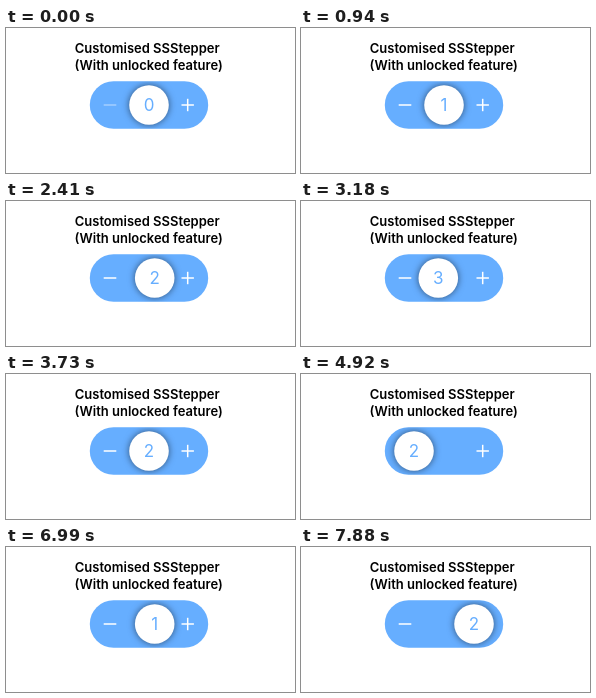
Animation of 289 by 145 pixels, one loop 7.99 s. Source, as an HTML page with a canvas:

```html
<!DOCTYPE html>
<html lang="en">
<head>
<meta charset="utf-8">
<title>Stepper</title>
<style>
  html, body { margin: 0; width: 100%; height: 100%; overflow: hidden; background: #fff; }
  canvas { display: block; width: 289px; height: 145px; }
</style>
</head>
<body>
<canvas id="stage"></canvas>
<script>
const W = 289, H = 145, LOOP = 7990;
const BLUE = '#66aeff';
const FONT = 'Inter, Roboto, sans-serif';
const CX = 143, CY = 77, RADIUS = 19.8;
const REACH = 30, STEP = 110;
const canvas = document.getElementById('stage');
const ctx = canvas.getContext('2d');
const dpr = window.devicePixelRatio || 1;
canvas.width = W * dpr;
canvas.height = H * dpr;

// Thumb drags; the last one is still held when the loop restarts.
const drags = [
  { start: 500, end: 940, dir: 1 },
  { start: 1650, end: 1990, dir: 1 },
  { start: 2410, end: 2840, dir: 1 },
  { start: 3180, end: 3730, dir: -1 },
  { start: 4600, end: 5040, dir: -1 },
  { start: 5650, end: 6140, dir: -1 },
  { start: 6340, end: 6770, dir: 1 },
  { start: 6990, end: 7440, dir: 1 },
  { start: 7760, end: 8200, dir: 1 }
];

// The thumb is pulled out quickly, held, then springs back while the value changes.
function poseAt(t) {
  const pose = { offset: 0, from: 0, to: 0, mix: 1 };
  for (const { start, end, dir } of drags) {
    if (t < start) break;
    const steps = Math.round((end - start) / STEP);
    const k = Math.min(steps, Math.floor((t - start) / (end - start) * steps));
    const left = steps - k;
    pose.offset = dir * REACH * Math.min(1, 0.19 + k, (left / 2) ** 1.35);
    pose.from = pose.to;
    pose.to += dir;
    pose.mix = left > 1 ? 0 : left ? 0.7 : 1;
  }
  return pose;
}

function text(str, x, y, font, color) {
  ctx.font = `${font} ${FONT}`;
  ctx.fillStyle = color;
  ctx.textAlign = 'center';
  ctx.fillText(str, x, y);
}

function bar(x, y, w, h, alpha = 1) {
  ctx.fillStyle = `rgba(255,255,255,${alpha})`;
  ctx.fillRect(x - w / 2, y - h / 2, w, h);
}

function digit(value, x, scale, alpha) {
  ctx.save();
  ctx.globalAlpha = alpha;
  ctx.translate(x, CY);
  ctx.scale(scale, scale);
  text(value, 0, 6.2, '400 17px', BLUE);
  ctx.restore();
}

function drawThumb(x) {
  ctx.save();
  ctx.shadowColor = 'rgba(0,0,0,0.55)';
  ctx.shadowBlur = 7 * dpr;
  ctx.fillStyle = '#fff';
  ctx.beginPath();
  ctx.arc(x, CY, RADIUS, 0, Math.PI * 2);
  ctx.fill();
  ctx.restore();
}

function draw(t) {
  const { offset, from, to, mix } = poseAt(t);
  const x = CX + offset;
  ctx.setTransform(dpr, 0, 0, dpr, 0, 0);
  ctx.fillStyle = '#fff';
  ctx.fillRect(0, 0, W, H);

  text('Customised SSStepper', 141.2, 25, '600 13px', '#000');
  text('(With unlocked feature)', 142.7, 42, '600 13px', '#000');

  ctx.save();
  ctx.fillStyle = BLUE;
  ctx.beginPath();
  ctx.roundRect(83.8, 53.2, 118.4, 47.5, 23.75);
  ctx.fill();
  ctx.clip();
  const minusAlpha = v => v > 0 ? 1 : 0.4;
  bar(104, CY, 12.6, 1.5, minusAlpha(from) * (1 - mix) + minusAlpha(to) * mix);
  bar(181.7, CY, 12.4, 1.5);
  bar(181.7, CY, 1.5, 12.4);
  drawThumb(x);
  ctx.restore();

  // Digits shrink slightly while they cross-fade.
  const scale = 1 - 0.7 * mix * (1 - mix);
  digit(from, x, scale, 1 - mix);
  digit(to, x, scale, mix);
}

const origin = performance.now();
function tick() {
  draw((performance.now() - origin) % LOOP);
  requestAnimationFrame(tick);
}
tick();
</script>
</body>
</html>
```
